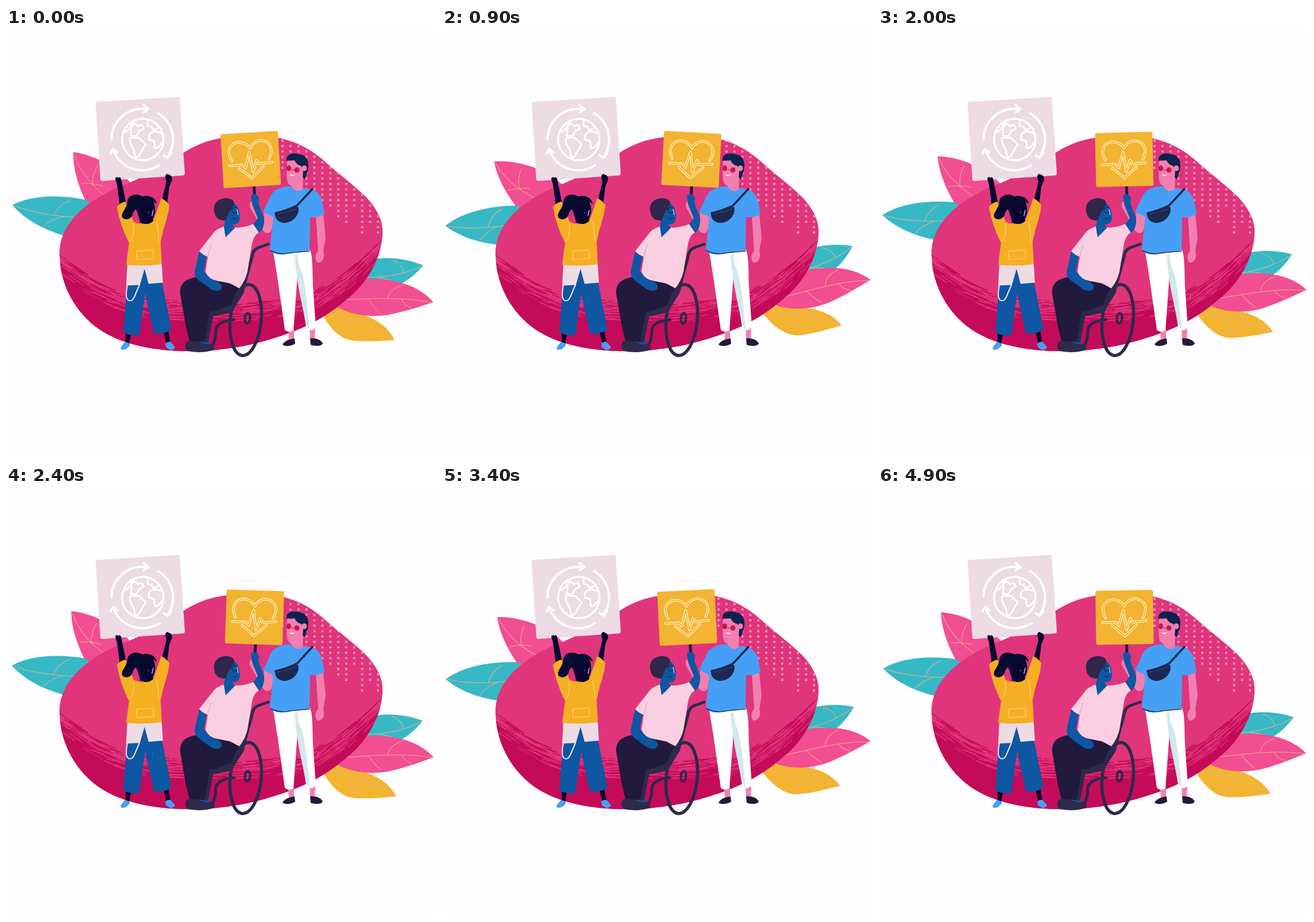
These frames come from a looping animation (748x748 px, 5 s). An HTML page with a canvas:

```html
<!DOCTYPE html>
<html lang="en">
<head>
<meta charset="utf-8">
<title>People with signs</title>
<style>
html, body { margin: 0; width: 100%; height: 100%; overflow: hidden; background: #fefdff; }
canvas { display: block; width: 748px; height: 748px; }
</style>
</head>
<body>
<canvas id="stage" width="748" height="748"></canvas>
<script>
const ctx = document.getElementById('stage').getContext('2d');
const LOOP = 5000, STEP = 100;
const C = {
  bg: '#fefdff', blob: '#e0357b', deep: '#c40b59', dot: '#f08bb9',
  rose: '#f24e92', teal: '#37b8c5', gold: '#f3b431', vein: '#e9b08c',
  pale: '#eddce3', night: '#0b0630', navy: '#0b2350', blue: '#0d57a3',
  sky: '#459ff5', coal: '#211a3c', steel: '#2d2a4c', skin: '#f27fb0',
  blush: '#f9cfe1', mustard: '#f5af22'
};

const fill = (d, color) => {
  ctx.fillStyle = color;
  ctx.fill(new Path2D(d));
};
const line = (d, color, w) => {
  ctx.strokeStyle = color;
  ctx.lineWidth = w;
  ctx.stroke(new Path2D(d));
};
const oval = (x, y, rx, ry, color, w, rot = 0) => {
  ctx.beginPath();
  ctx.ellipse(x, y, rx, ry, rot, 0, 7);
  if (w) {
    ctx.strokeStyle = color;
    ctx.lineWidth = w;
    ctx.stroke();
  } else {
    ctx.fillStyle = color;
    ctx.fill();
  }
};
const turned = (x, y, deg, draw) => {
  ctx.save();
  ctx.translate(x, y);
  ctx.rotate(deg * Math.PI / 180);
  ctx.translate(-x, -y);
  draw();
  ctx.restore();
};

// Monotone cubic curve through [x, y] keys
function track(keys, x) {
  const n = keys.length - 1;
  const slope = i => (keys[i + 1][1] - keys[i][1]) / (keys[i + 1][0] - keys[i][0]);
  const tangent = i => {
    if (i === 0) return slope(0);
    if (i === n) return slope(n - 1);
    const a = slope(i - 1), b = slope(i);
    return a * b <= 0 ? 0 : 2 * a * b / (a + b);
  };
  let i = 0;
  while (i < n - 1 && x > keys[i + 1][0]) i++;
  const [x0, y0] = keys[i], [x1, y1] = keys[i + 1];
  const w = x1 - x0, s = (x - x0) / w, r = 1 - s;
  return y0 * r * r * (1 + 2 * s) + y1 * s * s * (3 - 2 * s)
    + w * s * r * (tangent(i) * r - tangent(i + 1) * s);
}

const swayLeft = [[0, 0], [400, .36], [900, .96], [1180, 1], [1500, .9], [2400, .12], [2620, .03],
  [3000, .27], [3400, .75], [3850, 1], [4200, .92], [4900, .26], [5000, .17]];
const swayRight = [[0, 0], [400, .36], [900, .93], [1220, 1], [1500, .965], [2400, .12], [2640, .02],
  [3000, .28], [3400, .79], [3850, 1], [4200, .93], [4900, .29], [5000, .18]];

function signAngle(t) {
  const half = t / 900, leg = Math.floor(half);
  const p = 1 - (1 - half + leg) ** 1.6;
  return -3.4 + 6.4 * (leg % 2 ? 1 - p : p);
}

function leaf(shape, color, veins) {
  fill(shape, color);
  line(veins, C.vein, 1);
}

function leaves(t) {
  turned(182, 350, -12.4 * track(swayLeft, t), () => {
    leaf('M117 216C150 219 205 245 228 285L190 330 145 315C130 285 116 250 117 216Z', C.rose,
      'M119 220C127 245 143 270 180 298M130 270Q150 269 168 275M161 238Q150 252 150 274');
    leaf('M11 308C45 290 95 290 140 299L185 350 100 361C65 350 35 335 11 308Z', C.teal,
      'M14 309C45 321 75 326 125 330M83 326Q92 306 112 300M65 345Q80 331 100 328');
  });
  turned(573, 447, -14 * track(swayRight, t), () => {
    leaf('M726 413C695 400 665 398 640 402L580 440 620 455C680 460 705 436 726 413Z', C.teal,
      'M724 414C694 428 665 434 625 434M673 404Q690 410 692 426M648 434Q665 436 685 446');
    leaf('M676 543C662 513 630 496 560 482L545 487C560 520 580 542 605 544C635 546 655 544 676 543Z', C.gold,
      'M673 541C645 524 605 504 560 495M640 502Q627 507 625 516M597 505Q598 524 607 537');
    leaf('M743 477C718 447 675 435 625 436L573 455 572 483C600 500 635 504 665 499C695 493 722 484 743 477Z', C.rose,
      'M741 478C700 468 645 470 580 473M691 447Q666 454 664 470M630 471Q640 487 652 497M688 472Q692 482 706 487');
  });
}

const blobShape = 'M93 392C93 340 140 300 200 275C255 253 285 232 315 213C350 192 385 188 425 187' +
  'C485 186 520 203 550 228C590 264 615 280 632 300C650 322 657 340 655 362C652 400 630 440 600 466' +
  'C570 492 545 510 500 528C440 550 390 561 330 562C260 564 195 550 155 519C115 487 93 440 93 392Z';
const shade = [[93, 412], [170, 462], [250, 488], [400, 495], [500, 487], [570, 455], [656, 384]];

function blob() {
  ctx.save();
  ctx.clip(new Path2D(blobShape));
  fill(blobShape, C.blob);

  ctx.beginPath();
  ctx.moveTo(93, 600);
  for (let x = 93; x <= 656; x += 8) ctx.lineTo(x, track(shade, x));
  ctx.lineTo(656, 600);
  ctx.fillStyle = C.deep;
  ctx.fill();

  let seed = 11;
  const rnd = () => (seed = seed * 16807 % 2147483647) / 2147483647;
  for (let i = 0; i < 330; i++) {
    const x = 85 + 570 * rnd(), off = -17 + 34 * rnd(), len = 8 + 26 * rnd();
    ctx.beginPath();
    ctx.moveTo(x, track(shade, x) + off);
    ctx.lineTo(x + len, track(shade, x + len) + off - 2 * rnd());
    ctx.strokeStyle = off < 0 ? C.deep : C.blob;
    ctx.lineWidth = .4 + 1.3 * rnd();
    ctx.stroke();
  }

  const ends = [250, 260, 270, 285, 295, 300, 315, 328, 346, 318, 362, 342, 360];
  ends.forEach((end, i) => {
    for (let y = 196; y <= end; y += 9.4) oval(481 + 13.85 * i, y, 2.2, 2.2, C.dot);
  });
  ctx.restore();
}

function earthSign() {
  fill('M159 128.5L299 120Q302 120 302.300 123L311 252Q311 256 308 256.500L168 266Q164.500 266 164 263L156 132Q156 129 159 128.500Z', C.pale);
  const ring = (a, b) => {
    ctx.beginPath();
    ctx.arc(237, 194, 53.5, a * Math.PI / 180, b * Math.PI / 180);
    ctx.strokeStyle = '#fff';
    ctx.lineWidth = 4;
    ctx.stroke();
  };
  ring(180, 279);
  ring(-59, 33);
  ring(56, 158);
  line('M239 134L248 141 239 147M274 221L281 226 288 217M182 219L186 210 194 216', '#fff', 3.5);
  oval(238, 194, 36, 36, '#fff', 3.5);
  line('M208 181Q216 176 219 168L226 160M219 168Q226 165 229 171L236 168 240 175 232 179 227 188 217 187Z' +
    'M216 191L231 191 243 202 237 212 231 223 225 226Q223 214 221 209Q214 201 216 191Z' +
    'M247 161L246 170 253 172 257 178 266 173M272 184Q262 178 254 181Q246 186 249 194L258 197 259 209Q264 211 272 199', '#fff', 3);
}

function girl() {
  fill('M190 262Q192 257 196 261L197 259Q201 261 201 266L209 305 198 309 193 272Z', C.night);
  fill('M277 258Q279 252 283 255Q289 256 289 264L284 276 280 308 270 304 279 268Z', C.night);
  fill('M208 530L218 530 214 550 208 550Z M273 525L282 525 286 548 279 549Z', C.night);
  fill('M207 546Q217 548 215 553L208 559 201 560Q197 557 203 551Z', C.sky);
  fill('M277 549Q284 543 288 548L294 555Q292 561 285 560L278 555Z', C.sky);
  fill('M211 440L204 529Q217 537 232 534L242 462 257 531Q273 534 288 525L271 440 241 416Z', C.blue);
  fill('M211 411L271 411 273 443 248 445 241 419 233 447 209 448Z', C.pale);
  line('M211 448Q207 468 212 473Q219 478 224 466L232 447', '#f7e6ee', 2);
  fill('M193 311Q200 303 208 302L222 337Q240 346 257 334L270 296Q279 300 284 308Q283 323 274 350L269 372 271 411Q240 415 209 412L214 374Q199 345 193 311Z', C.mustard);
  fill('M230 322L254 322 256 336Q246 345 233 338Z', C.night);
  oval(244, 316, 15.5, 23, C.night);
  fill('M231 330C226 318 228 312 234 308C246 312 256 309 257 302L262 306C262 297 250 289 237 293C226 286 211 291 211 303C208 318 200 320 202 329C207 336 220 333 221 321L226 315Z', '#080b30');
  line('M256 317L254 326', '#8acbff', 1.5);
  oval(248, 321, 1.5, 1.5, C.blue);
  line('M221 342Q224 356 217 371M262 338Q266 355 266 371M228 388L256 386 257 401 228 403Z', '#fbd48a', 1);
}

function standingMan() {
  fill('M449 319L467 326 462 352C458 360 450 357 447 352L424 311C423 300 430 298 433 304L449 337Z', C.skin);
  fill('M539 326L552 324 556 365 552 388C556 399 550 409 542 408C536 403 538 393 543 388Z', C.skin);
  fill('M491 524L501 524 501 543 492 543ZM528 520L538 520 537 543 529 543Z', C.skin);
  fill('M481 551C484 544 494 541 502 540L503 549C497 553 488 555 481 551Z', C.coal);
  fill('M529 540C538 539 548 542 551 549C547 555 535 553 530 551Z', C.coal);
  fill('M465 390L529 386C534 400 533 425 534 450L539 521C535 526 528 527 523 525L507 430 500 526C495 529 489 529 485 525L473 440Z', '#fff');
  fill('M502 395Q505 445 524 520L528 524Q521 440 513 420Q506 409 508 394Z', '#d2e8eb');
  fill('M489 230L520 232 523 242 517 259 516 285Q506 289 496 282L497 274C487 273 488 259 489 230Z', C.skin);
  fill('M488 231C486 219 500 216 512 220C525 222 528 235 525 248L520 263 516 260 517 249 514 240Q505 238 502 230Z', C.navy);
  oval(519, 244, 4.5, 5, C.skin);
  oval(492, 244, 4, 5, '#c8154f');
  oval(506, 247, 4.5, 4.5, '#c8154f');
  line('M496 247L502 247', '#c8154f', 1);
  fill('M492 254Q498 257 503 254Q499 261 492 254Z', '#fff');
  fill('M496 275L486 276C472 279 463 283 458 298L447 320 465 329 459 386C467 396 480 395 496 391L528 387 529 329 541 329 554 324C551 302 548 288 536 282L517 278C513 286 503 286 496 275Z', C.sky);
  line('M460 387Q478 396 496 391L528 388', '#1b3668', 1.5);
  line('M533 280L506 309Q490 317 469 322', '#1d2850', 3.5);
  fill('M468 321C480 320 495 311 508 311C512 323 501 338 485 339C473 339 467 331 468 321Z', '#1d2850');
  line('M473 324Q490 320 504 315', '#414b76', 1);
}

function heartSign(t) {
  turned(433, 300, signAngle(t), () => {
    line('M433 270L433 298', C.coal, 5);
    ctx.fillStyle = C.gold;
    ctx.beginPath();
    ctx.roundRect(380, 181.5, 100, 94, 3);
    ctx.fill();
    const icon = 'M397 229C385 207 402 194 415 198C424 200 427 204 430 209C434 200 446 193 456 198C469 204 469 218 462 229' +
      'M409 243L430 261 451 242M392 237L415 237 420 243 428 216 433 250 440 230 444 237 467 235';
    line(icon, '#fff4d5', 4.4);
    line(icon, C.gold, 2);
  });
}

function seatedMan() {
  line('M456 376L439 382Q429 386 428 398L414 449', C.steel, 5);
  line('M396 507Q366 511 365 526Q365 545 357 555', C.steel, 5);
  fill('M361 484L402 451 420 430 414 460 393 494Q380 499 360 501Z', C.steel);
  fill('M328 538L354 538 353 552 328 553Z', C.blue);
  fill('M312 552Q312 544 323 543L335 545Q345 552 358 549Q364 552 362 560Q340 567 317 562Q312 560 312 552Z', C.steel);
  fill('M342 432C312 434 302 444 303 462L313 520 319 544 351 547 362 493 396 480Q406 467 406 452C390 443 370 440 352 437Z', C.coal);
  fill('M355 493L362 493 351 547 345 546Z', C.steel);
  fill('M336 389L350 394 344 423 364 440Q377 444 375 453Q369 461 356 454L334 438Q326 430 329 420Z', C.blue);
  fill('M426 292C429 287 440 289 440 297L439 305 449 331C450 344 445 354 438 358L427 345 438 331 428 306Z', C.blue);
  fill('M380 345Q365 349 358 360L336 388Q342 395 351 398L347 424Q352 437 368 440L390 444 406 453Q417 438 420 424L428 375Q431 360 440 356L430 341Q414 348 397 347L384 361Z', C.blush);
  line('M351 397L357 376', '#d69bba', 1);
  fill('M386 313L397 305C404 309 406 317 407 328C407 339 401 343 394 341L398 348 382 364 379 346 382 328Z', C.blue);
  fill('M363 322C357 302 375 293 390 297C399 300 399 309 393 312L387 322 382 335C372 335 364 331 363 322Z', '#30264a');
  oval(398, 317, 5, 5, '#16264f', 1.5);
  line('M387 314L393 315', '#16264f', 1.5);
  line('M402 315L404 325', '#a7d7ff', 1.3);
  line('M395 331Q400 333 402 330', '#16264f', 1.2);
  oval(417, 508, 27, 62, C.steel, 5.5, .1);
  oval(420, 505, 4.5, 9, C.steel, 4, .1);
}

function draw(t) {
  ctx.fillStyle = C.bg;
  ctx.fillRect(0, 0, 748, 748);
  leaves(t);
  blob();
  earthSign();
  girl();
  standingMan();
  heartSign(t);
  seatedMan();
}

ctx.lineCap = ctx.lineJoin = 'round';
const start = performance.now();
function tick() {
  const t = (performance.now() - start) % LOOP;
  draw(Math.floor(t / STEP) * STEP);
  requestAnimationFrame(tick);
}
tick();
</script>
</body>
</html>
```
